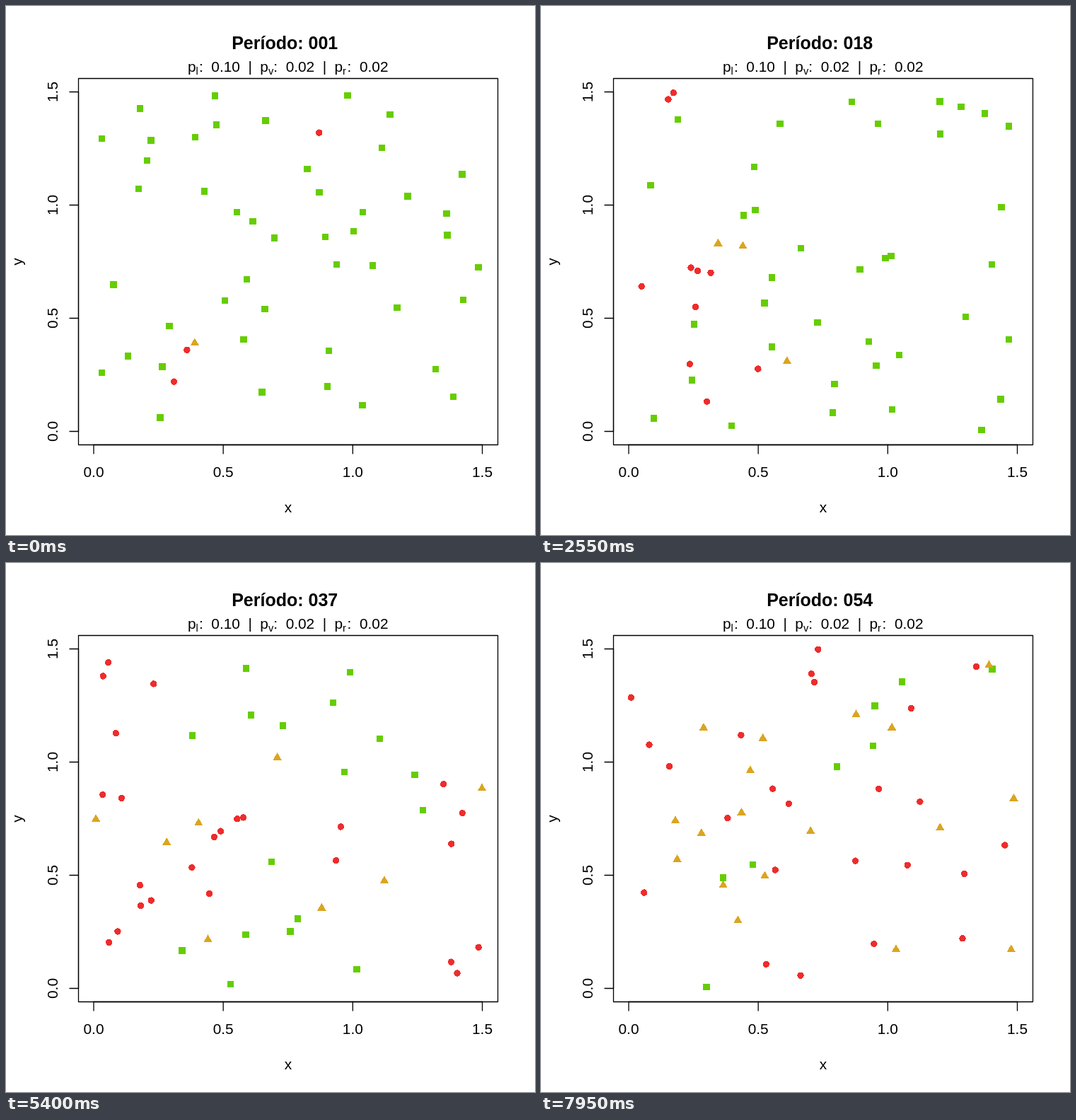
Animation of 748 by 748 pixels, one loop 8 s. Source, as an HTML page:

```html
<!DOCTYPE html>
<html lang="pt">
<head>
<meta charset="utf-8">
<title>Período</title>
<style>
  html, body { margin: 0; width: 100%; height: 100%; overflow: hidden; background: #fff; }
  svg { display: block; width: 100vw; height: 100vh; }
  text { font: 20.83px "Liberation Sans", Arial, sans-serif; white-space: pre; }
  .title { font-size: 25px; font-weight: bold; }
  .sub { font-size: 14.6px; }
  .mid { text-anchor: middle; }
  .line { fill: none; stroke: #000; stroke-width: 1.3; stroke-linecap: round; stroke-linejoin: round; }
</style>
</head>
<body>
<svg viewBox="0 0 748 748">
  <text class="title" x="319.2" y="61">Período: <tspan id="count">001</tspan></text>
  <g id="rates"></g>
  <g id="dots" shape-rendering="crispEdges"></g>
  <rect class="line" x="102.5" y="102.5" width="593" height="518"/>
  <g id="axes"></g>
  <text class="mid" x="399" y="716">x</text>
  <text class="mid" transform="translate(23 361.5) rotate(-90)">y</text>
</svg>
<script>
const STEP = 150, LOOP = 8000, PERIODS = Math.ceil(LOOP / STEP);
const SIZE = 1.5, STRIDE = 0.1, PEOPLE = 50;
const WELL = 0, SICK = 1, DONE = 2;
const LOOKS = [
  { fill: '#66cd00', d: 'M-4.7-4.7h9.4v9.4h-9.4z' },
  { fill: '#ee2c2c', d: 'M-4.7 0a4.7 4.7 0 1 0 9.4 0a4.7 4.7 0 1 0-9.4 0z' },
  { fill: '#daa520', d: 'M0-7.3L6.3 3.65H-6.3z' }
];
// Period, number still well, number recovered
const COURSE = [[1, 46, 1], [9, 42, 2], [18, 37, 3], [29, 29, 5], [37, 17, 8], [42, 12, 10], [54, 8, 18]];

const $ = id => document.getElementById(id);
const px = x => 124 + x * 549.5 / SIZE;
const py = y => 601.5 - y * 480 / SIZE;

function add(parent, tag, attrs, text = '') {
  const el = document.createElementNS('http://www.w3.org/2000/svg', tag);
  for (const k in attrs) el.setAttribute(k, attrs[k]);
  el.textContent = text;
  return parent.appendChild(el);
}

let seed = 2024;
function rand() {
  seed = (seed * 1664525 + 1013904223) % 4294967296;
  return seed / 4294967296;
}

// The field wraps around at its edges.
const wrap = v => (v + SIZE) % SIZE;
const shortest = d => d - SIZE * Math.round(d / SIZE);
const gap = (a, b) => Math.hypot(shortest(a.x - b.x), shortest(a.y - b.y));
const nearest = (a, list) => Math.min(...list.map(b => gap(a, b)));

function course(period, col) {
  const k = Math.max(1, COURSE.findIndex(key => key[0] >= period));
  const a = COURSE[k - 1], b = COURSE[k];
  return Math.round(a[col] + (b[col] - a[col]) * (period - a[0]) / (b[0] - a[0]));
}

function firstDots() {
  const dots = [
    { x: 0.39, y: 0.39, state: DONE },
    { x: 0.87, y: 1.32, state: SICK },
    { x: 0.36, y: 0.36, state: SICK },
    { x: 0.31, y: 0.22, state: SICK }
  ];
  while (dots.length < PEOPLE) {
    const dot = { x: rand() * SIZE, y: rand() * SIZE, state: WELL };
    if (nearest(dot, dots) > 0.07) dots.push(dot);
  }
  return dots.map(dot => ({ ...dot, since: 1 }));
}

function walk(dot) {
  const angle = rand() * 2 * Math.PI;
  return { ...dot, x: wrap(dot.x + STRIDE * Math.cos(angle)), y: wrap(dot.y + STRIDE * Math.sin(angle)) };
}

// Those closest to the sick fall ill; those sick longest recover.
function nextDots(last, period) {
  const dots = last.map(walk), only = state => dots.filter(d => d.state === state);
  const well = only(WELL), sick = only(SICK), done = only(DONE);
  const cured = sick.sort((a, b) => a.since - b.since).slice(0, course(period, 2) - done.length);
  const caught = well.sort((a, b) => nearest(a, sick) - nearest(b, sick))
    .slice(0, well.length - course(period, 1));
  cured.forEach(d => { d.state = DONE; });
  caught.forEach(d => { d.state = SICK; d.since = period; });
  return dots;
}

const history = [firstDots()];
while (history.length < PERIODS) history.push(nextDots(history.at(-1), history.length + 1));

// Start, subscript, value start, value
[[257, 'l', 290.4, '0.10'], [359.3, 'v', 395.7, '0.02'], [464.5, 'r', 500, '0.02']]
  .forEach(([x, sub, end, value]) => {
    const g = $('rates');
    add(g, 'text', { x, y: 93 }, 'p');
    add(g, 'text', { x: x + 11.6, y: 97, class: 'sub' }, sub);
    add(g, 'text', { x: end - 17.4, y: 93 }, ':  ' + value);
  });
for (const x of [342.4, 447.8]) add($('rates'), 'text', { x, y: 93 }, '|');

add($('axes'), 'path', { class: 'line', d: `M${px(0)} 620.5H${px(SIZE)}M102.5 ${py(0)}V${py(SIZE)}` });
for (let v = 0; v <= SIZE; v += 0.5) {
  const x = px(v), y = py(v), label = v.toFixed(1);
  add($('axes'), 'path', { class: 'line', d: `M${x} 620.5v12.5M102.5 ${y}h-12.5` });
  add($('axes'), 'text', { class: 'mid', x, y: 666 }, label);
  add($('axes'), 'text', { class: 'mid', transform: `translate(73 ${y}) rotate(-90)` }, label);
}

const marks = history[0].map(() => add($('dots'), 'path', {}));
let shown = 0;

function draw(time) {
  const period = Math.floor((time % LOOP) / STEP) + 1;
  if (period === shown) return;
  shown = period;
  $('count').textContent = String(period).padStart(3, '0');
  history[period - 1].forEach(({ x, y, state }, i) => {
    marks[i].setAttribute('d', LOOKS[state].d);
    marks[i].setAttribute('fill', LOOKS[state].fill);
    marks[i].setAttribute('transform', `translate(${px(x)} ${py(y)})`);
  });
}

const begin = performance.now();
function tick() {
  draw(performance.now() - begin);
  requestAnimationFrame(tick);
}
tick();
</script>
</body>
</html>
```
